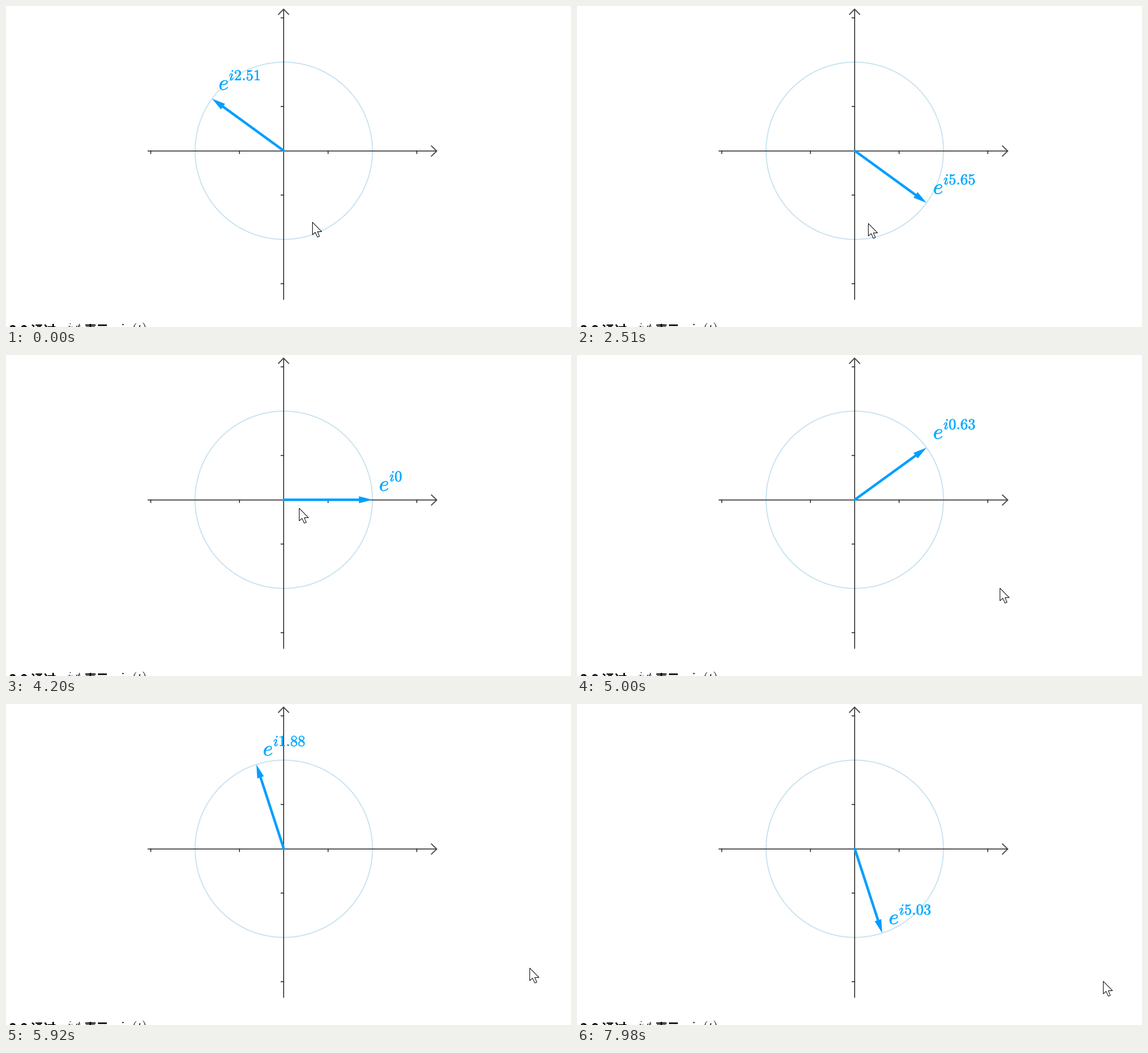
A matplotlib script for the animation above (8 s loop, 897 by 510 pixels).

```python
import math

import matplotlib.pyplot as plt
import numpy as np
from matplotlib.animation import FuncAnimation
from matplotlib.patheffects import withStroke

W, H, DPI = 897, 510, 64
STEP, LOOP = 20, 8000
PT = 72 / DPI  # points per pixel
CX, CY, R = 441, 230, 140.8

AXIS = "#262626"
TIP = "#484848"
RING = "#c6e1f0"
BLUE = "#009eff"
LABEL = "#06aaff"

plt.rcParams["mathtext.fontset"] = "cm"

fig = plt.figure(figsize=(W / DPI, H / DPI), dpi=DPI, facecolor="white")
ax = fig.add_axes([0, 0, 1, 1])
ax.set_xlim(0, W)
ax.set_ylim(H, 0)
ax.axis("off")


def line(xs, ys, color, width, z, **kw):
    return ax.plot(xs, ys, color=color, lw=width * PT, zorder=z, snap=False, **kw)[0]


def write(x, y, text, size, color="black", **kw):
    return ax.text(x, y, text, fontsize=size * PT, color=color, zorder=4,
                   va="baseline", ha="left", **kw)


def draw_plane():
    ring = np.linspace(0, 2 * math.pi, 361)
    line(CX + R * np.cos(ring), CY + R * np.sin(ring), RING, 1.6, 1)

    ox, oy = CX - 0.3, CY + 0.4
    line([225.5, 683.5], [oy, oy], AXIS, 1.4, 2)
    line([ox, ox], [5.5, 466], AXIS, 1.4, 2)
    for k in (-1.5, -0.5, 0.5, 1.5):
        line([CX + k * R] * 2, [oy, oy + 4], AXIS, 1.4, 2)
        line([ox - 4, ox], [CY + k * R] * 2, AXIS, 1.4, 2)

    line([675.5, 683.8, 675.5], [oy - 8, oy, oy + 8], TIP, 1.7, 2)
    line([ox - 8, ox, ox + 8], [13.3, 5, 13.3], TIP, 1.7, 2)


def draw_heading():
    cjk = dict(family="Noto Sans CJK JP", weight="bold")
    write(5.3, 522, "3.2 通过", 20, **cjk)
    write(88, 520.5, "$e$", 21)
    write(97, 515, r"$i\omega t$", 16.5)
    write(123.5, 522, "表示", 20, **cjk)
    write(174, 520, r"$\mathrm{sin}(t)$", 21)


draw_plane()
draw_heading()

# arrow and its label e^{i angle}
shaft = line([], [], BLUE, 4, 5, solid_capstyle="round")
head = ax.fill([0, 0, 0], [0, 0, 0], color=BLUE, lw=0, zorder=5)[0]
bold = [withStroke(linewidth=0.45 * PT, foreground=LABEL)]
base = write(0, 0, "$e$", 34, LABEL, path_effects=bold)
power = write(0, 0, "", 24, LABEL, path_effects=bold)

POINTER = np.array([(0, 0), (0, 20), (4.5, 16), (8, 23.7), (11.2, 22.4),
                    (8, 15), (14.7, 15)]) + 0.5
pointer = ax.fill(*POINTER.T, fc="white", ec="black", lw=0.9 * PT, zorder=9)[0]

# the angle grows by a fifth of pi at each tick, pausing at 2 pi before it wraps
TICKS = np.concatenate([np.linspace(460, 2900, 6), np.linspace(4200, 6470, 6),
                        np.linspace(6980, 7980, 3)])
START, VALUES = 4, 11

# pointer path: time, x, y
PATH = np.array([
    (0, 486, 343), (1100, 485, 340), (2360, 485, 340), (2490, 462, 345),
    (3420, 460, 348), (3560, 448, 290), (3800, 507, 200), (3990, 465, 243),
    (4280, 465, 243), (4980, 671, 370), (5340, 671, 370), (5910, 831, 418),
    (6140, 833, 440), (7000, 835, 440),
])


def set_vector(angle):
    ux, uy = math.cos(angle), -math.sin(angle)
    x, y = CX + R * ux, CY + R * uy
    bx, by = x - 21.5 * ux, y - 21.5 * uy
    shaft.set_data([CX, bx], [CY, by])
    head.set_xy([(x, y), (bx - 5.5 * uy, by + 5.5 * ux),
                 (bx + 5.5 * uy, by - 5.5 * ux)])
    base.set_position((x + 10.4, y - 14))
    power.set_position((x + 26.8, y - 29.3))
    power.set_text(rf"$i\mathrm{{{round(angle, 2):g}}}$")


def update(n):
    t = n * STEP
    k = (START + np.sum(t >= TICKS)) % VALUES
    set_vector(k * math.pi / 5)
    pos = [round(np.interp(t, PATH[:, 0], PATH[:, c])) for c in (1, 2)]
    pointer.set_xy(POINTER + pos)
    return shaft, head, base, power, pointer


anim = FuncAnimation(fig, update, frames=LOOP // STEP, interval=STEP,
                     init_func=lambda: update(0), repeat=True, repeat_delay=0)
plt.show()
```
